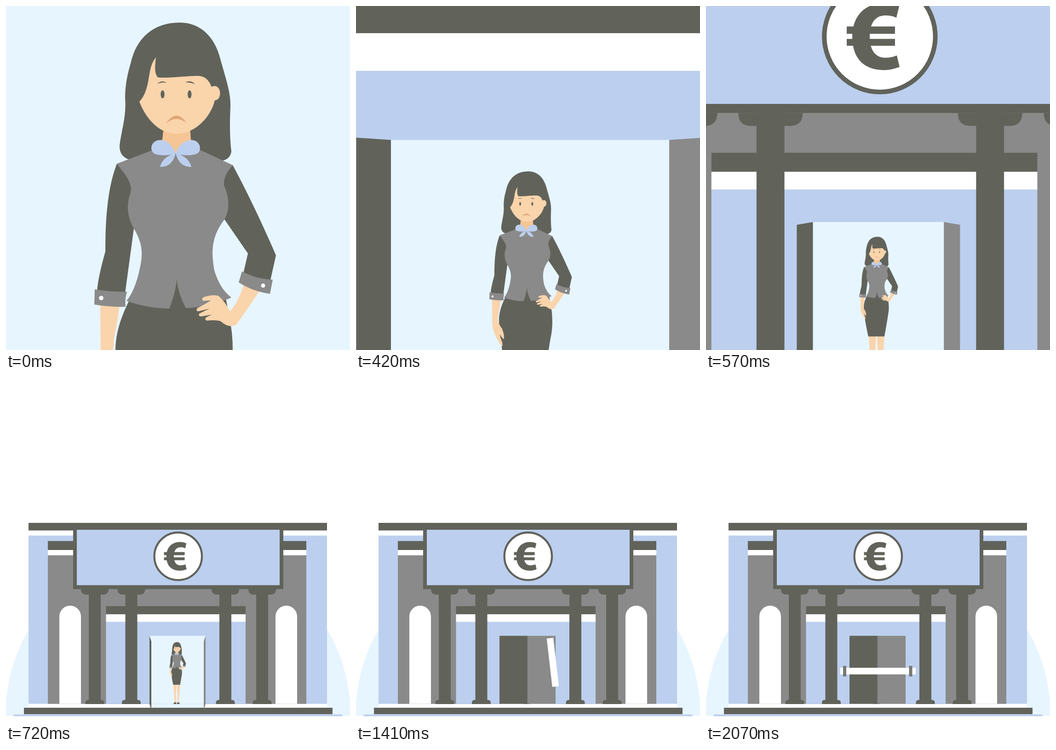
Animation, 748 px wide and 748 px high, one loop 3390 ms. Source, as an HTML page:

```html
<!DOCTYPE html>
<html lang="en">
<head>
<meta charset="utf-8">
<title>Bank closing</title>
<style>
  html, body { margin: 0; width: 100%; height: 100%; overflow: hidden; background: #fff; }
  svg { display: block; width: 100%; height: 100%; }
  .dark { fill: #61635b; }
  .gray { fill: #8a8a8a; }
  .blue { fill: #bccfee; }
  .pale { fill: #e7f5ff; }
  .skin { fill: #fad4ab; }
  .white { fill: #fff; }
</style>
</head>
<body>
<svg viewBox="0 0 748 748">
  <defs>
    <g id="column" class="dark">
      <rect x="-13" y="455" width="26" height="254"/>
      <path d="M-30 459H30Q30 471 18 471H-18Q-30 471 -30 459Z"/>
      <path d="M-20.500 709V706Q-20.500 700 -14 700H14Q20.500 700 20.500 706V709Z"/>
    </g>
    <path id="arch" class="white" d="M0 708.500V518.500a23.500 23.500 0 0 1 47 0V708.500Z"/>
    <path id="bow" class="blue" d="M369 320C362 300 345 289 330 292C313 296 312 318 325 322C340 327 362 324 369 320Q340 328 335 350Q362 350 369 320Z"/>
  </defs>

  <g id="camera">
    <path class="pale" d="M-1 734A375 375 0 0 1 749 734Z"/>
    <rect class="blue" x="16" y="731.500" width="716" height="4" rx="2"/>
    <rect class="white" x="49" y="708" width="649" height="10"/>
    <rect class="dark" x="39" y="717" width="671" height="14"/>

    <rect class="blue" x="49" y="342" width="649" height="366.500"/>
    <rect class="white" x="49" y="331" width="649" height="11.500"/>
    <rect class="gray" x="91" y="385" width="562" height="323.500"/>
    <rect class="white" x="91" y="373" width="562" height="12.500"/>
    <rect class="dark" x="91" y="354.500" width="562" height="19.500"/>
    <use href="#arch" x="116"/>
    <use href="#arch" x="586"/>

    <rect class="blue" x="217.500" y="529" width="303.500" height="179.500"/>
    <rect class="white" x="217.500" y="513" width="303.500" height="17.200"/>
    <rect class="dark" x="217.500" y="496" width="303.500" height="17.700"/>

    <rect class="pale" x="312" y="560.500" width="122" height="148"/>
    <path class="pale" id="floor"/>

    <g id="woman">
      <path class="skin" d="M289 1040H364L352 1220Q350 1340 354 1470H318Q312 1330 302 1260ZM373 1040H448L434 1260Q422 1330 414 1470H380Q386 1340 382 1220Z"/>
      <path class="dark" d="M318 1462Q336 1474 354 1462L360 1507H290Q294 1484 318 1462ZM414 1462Q396 1474 380 1462L372 1507H442Q438 1484 414 1462Z"/>
      <path id="hair" class="dark" d="M378 36C425 36 455 70 466 115C480 165 489 190 488 220C486 260 487 290 490 316Q488 332 472 336L265 333Q246 325 247 303C252 265 262 240 259 200C259 170 265 145 271 125C283 70 320 36 378 36Z"/>
      <path fill="#f6c595" d="M343 262H400L402 290L420 312L369 330L317 314L340 290Z"/>
      <g id="head">
        <path class="skin" d="M326 112C314 125 313 145 309 165Q303 195 290 208C302 240 330 278 371 278C412 278 446 240 454 205C469 206 470 174 453 174Q449 174 447 176Q438 152 418 152C390 152 345 158 330 155C322 145 324 130 326 112Z"/>
        <g id="features" class="dark">
          <ellipse cx="340.500" cy="192" rx="4.200" ry="8.700"/>
          <ellipse cx="399.200" cy="192" rx="4.200" ry="8.700"/>
          <path d="M329 169Q339 160 350 167Q340 165 329 169ZM390 166Q402 160 411 170Q402 166 390 166Z"/>
          <path fill="#e0a577" d="M348 255Q371 222 393 255Q371 236 348 255Z"/>
        </g>
      </g>

      <path class="dark" d="M268 640C248 680 238 715 238 748C238 800 248 880 284 1049H448C462 980 474 900 484 840Q495 790 493 748Q493 710 486 680L478 635L445 590H300Z"/>
      <path class="skin" d="M205 650H247Q242 690 235 720L233 748Q238 772 252 788Q266 822 261 840Q251 834 241 813Q242 830 250 846Q258 864 253 876Q232 852 220 820Q206 790 206 764Z"/>
      <path class="dark" d="M241 343L300 380L285 484H278L259 624L198 620Q200 590 216 534C216 440 225 385 241 343Z"/>
      <path class="dark" d="M493 346L440 380L460 464H475L526 538L514 590L573 605L587 542C560 480 530 415 493 346Z"/>
      <path class="gray" d="M317 314L241 343C262 370 275 385 271 405C262 430 262 455 278 484C300 520 297 545 290 575Q280 620 262 641Q305 657 355 658Q370 620 371 593Q374 625 391 657Q440 655 490 634Q465 615 453 575C445 530 448 500 475 464C488 440 485 415 474 390C472 375 482 358 493 346L420 312L369 320Z"/>
      <path class="gray" d="M193 616Q225 622 263 621Q258 640 260 654Q225 655 192 649Z"/>
      <path class="skin" d="M517 605C510 630 500 650 487 664Q478 645 462 630Q445 627 428 634Q424 641 431 641L446 640Q430 650 416 657Q412 663 418 664L442 658Q428 665 420 669Q418 675 424 675L448 671Q438 675 434 678Q432 684 438 684Q455 682 466 685Q480 697 490 696Q500 696 505 687L551 620Z"/>
      <path class="gray" d="M513 577Q545 594 580 595L574 626Q535 620 506 601Z"/>
      <circle class="white" cx="207" cy="635" r="4.800"/>
      <circle class="white" cx="559" cy="608" r="4.500"/>
      <use href="#bow"/>
      <use href="#bow" transform="matrix(-1 0 0 1 738 0)"/>
    </g>

    <path class="dark" id="leftDoor"/>
    <path class="gray" id="rightDoor"/>

    <g id="bar">
      <rect class="white" id="plank" y="-7.200" height="14.400"/>
    </g>
    <g fill="#777874">
      <rect class="bracket" x="298" y="626" width="7" height="23"/>
      <rect class="bracket" x="441.500" y="626" width="7" height="23"/>
    </g>

    <use href="#column" x="193"/>
    <use href="#column" x="272.500"/>
    <use href="#column" x="477"/>
    <use href="#column" x="557"/>

    <rect class="dark" x="49" y="315" width="649" height="16.500"/>
    <rect class="dark" x="146" y="329" width="457" height="130"/>
    <rect class="blue" x="154" y="330" width="441" height="120.500"/>
    <circle cx="374.300" cy="387.700" r="51.700" fill="#fff" stroke="#61635b" stroke-width="4.300"/>
    <path id="euro" class="dark" d="M421 132Q402 139 388 139C340 139 318 110 318 66C318 22 345 -7 388 -7Q404 -7 420 0L414 25Q404 20 390 20C366 20 356 40 356 66C356 92 366 112 390 112Q403 112 415 107ZM306 44H411V60H306ZM306 71H411V86H306Z"/>
  </g>
</svg>
<script>
const LOOP = 3390, STEP = 30, END = 2070;
const FOCUS = { x: 371.6, y: 628.5 };
const HINGE = { left: 312, right: 434, top: 560.5, bottom: 708.5 };

// time, scale
const ZOOM = [[0, 10.92], [270, 7.61], [420, 4.96], [570, 2.335], [720, 1]];
// time, how far the head is turned to the side
const TURN = [[0, 0], [270, 1], [420, 0.15], [570, 0]];
// time, free edge distance from hinge, drop of its top, drop of its bottom
const DOOR = [[0, -15.2, -1, 12], [420, -15.2, -1, 12], [570, -15, 2.6, 12],
  [720, 4, 12, 14], [1110, 57, 4, 6], [1230, 61.3, 0, 0]];
// time, right end x, right end y, angle, length
const BAR = [[1260, 434, 671, 87, 0], [1410, 434, 671, 83.4, 106], [1500, 437, 669, 75, 164],
  [1620, 443, 665.7, 53, 164], [1890, 456, 637.3, 0, 164]];

const $ = id => document.getElementById(id);
const set = (id, name, value) => $(id).setAttribute(name, value);
const clamp = v => Math.min(1, Math.max(0, v));
const zoomAt = s => `translate(${FOCUS.x} ${FOCUS.y}) scale(${s}) translate(${-FOCUS.x} ${-FOCUS.y})`;

function locate(keys, t) {
  let i = 0;
  while (i < keys.length - 2 && t >= keys[i + 1][0]) i++;
  return [i, clamp((t - keys[i][0]) / (keys[i + 1][0] - keys[i][0]))];
}

function linear(keys, t) {
  const [i, u] = locate(keys, t);
  return keys[i].slice(1).map((v, k) => v + (keys[i + 1][k + 1] - v) * u);
}

// Cubic curve through the keys, at rest at both ends
function smooth(keys, t) {
  const [i, u] = locate(keys, t);
  const slope = k => k === 0 || k === keys.length - 1 ? 0
    : (keys[k + 1][1] - keys[k - 1][1]) / (keys[k + 1][0] - keys[k - 1][0]);
  const span = keys[i + 1][0] - keys[i][0], v = 1 - u;
  return keys[i][1] * v * v * (1 + 2 * u) + keys[i + 1][1] * u * u * (3 - 2 * u)
    + span * u * v * (slope(i) * v - slope(i + 1) * u);
}

function doorPath(hinge, edge, topDrop, bottomDrop) {
  const { top, bottom } = HINGE;
  return `M${hinge} ${top}L${edge} ${top + topDrop}V${bottom + bottomDrop}L${hinge} ${bottom}Z`;
}

function turnHead(turn) {
  const squeeze = `matrix(${1 - 0.064 * turn} 0 0 1 ${27 * turn} 0)`;
  set('hair', 'transform', squeeze);
  set('head', 'transform', squeeze);
  set('features', 'transform', `translate(${-13 * turn} 0)`);
}

function draw(t) {
  set('camera', 'transform', zoomAt(smooth(ZOOM, t)));
  turnHead(linear(TURN, t)[0]);

  const [reach, topDrop, bottomDrop] = linear(DOOR, t);
  const { left, right, bottom } = HINGE;
  set('leftDoor', 'd', doorPath(left, left + reach, topDrop, bottomDrop));
  set('rightDoor', 'd', doorPath(right, right - reach, topDrop, bottomDrop));
  const inset = Math.max(0, reach), sill = Math.min(bottomDrop, 8.5);
  set('floor', 'd', `M${left} ${bottom}L${left + inset} ${bottom + sill}H${right - inset}L${right} ${bottom}Z`);

  const [x, y, angle, length] = linear(BAR, t);
  set('bar', 'transform', `translate(${x} ${y}) rotate(${angle})`);
  set('plank', 'x', -length);
  set('plank', 'width', length);

  const grow = clamp((t - 1890) / (END - 1890));
  for (const bracket of document.querySelectorAll('.bracket')) {
    bracket.setAttribute('y', 637.5 - 11.5 * grow);
    bracket.setAttribute('height', 23 * grow);
  }
}

set('woman', 'transform', zoomAt(1 / ZOOM[0][1]));
set('euro', 'transform', zoomAt(1 / 2.337));

const start = performance.now();
function tick() {
  const t = (performance.now() - start) % LOOP;
  draw(Math.min(END, Math.floor(t / STEP) * STEP));
  requestAnimationFrame(tick);
}
tick();
</script>
</body>
</html>
```
